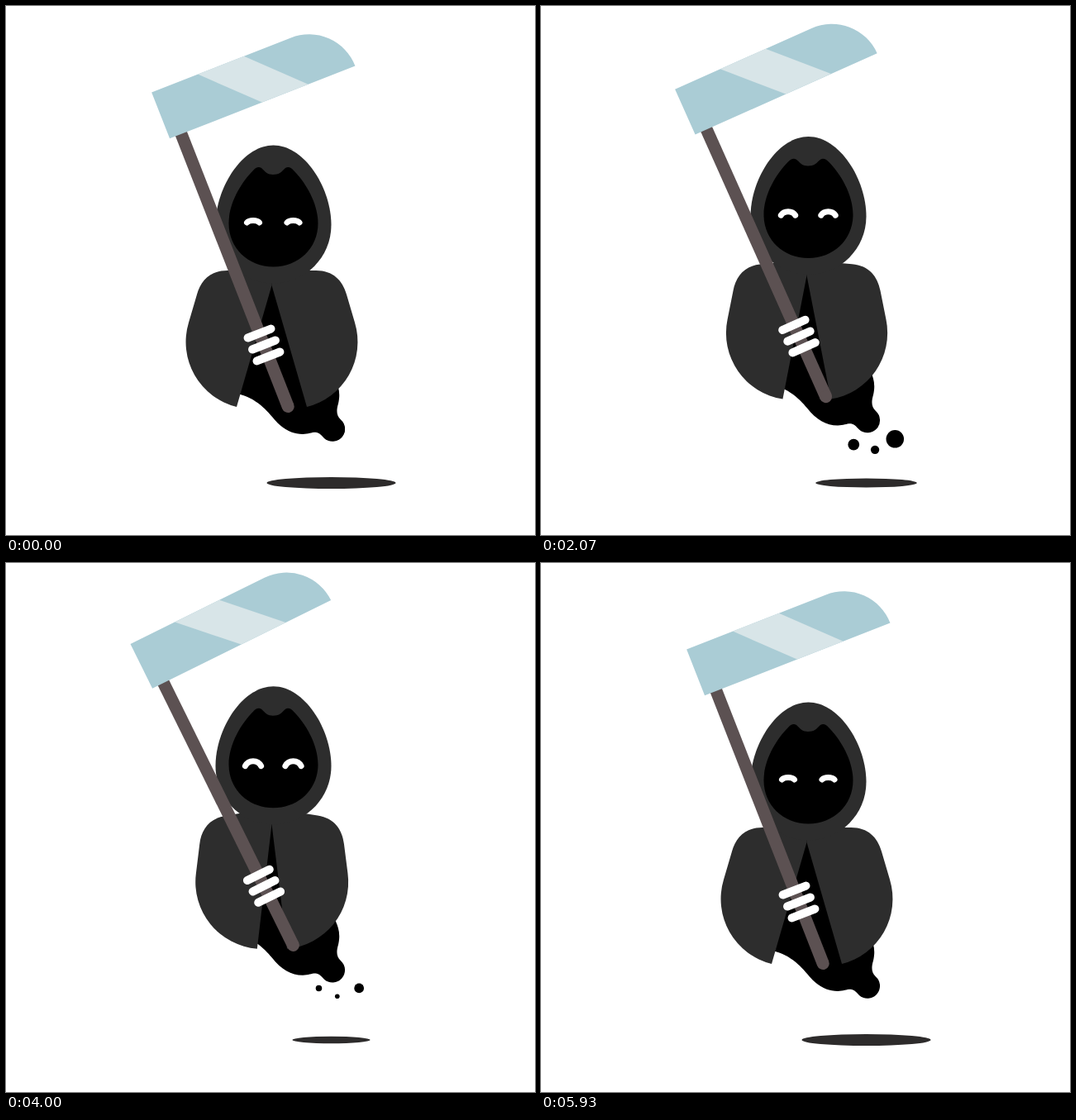
An HTML page for the animation above (6 s loop, 640x640 px).

```html
<!DOCTYPE html>
<html lang="en">
<head>
<meta charset="utf-8">
<title>Floating reaper</title>
<style>
html, body { margin: 0; width: 100%; height: 100%; overflow: hidden; background: #fff; }
svg { display: block; width: 100vw; height: 100vh; }
</style>
</head>
<body>
<svg viewBox="0 0 640 640">
  <defs>
    <path id="cloak" d="M279 485L321.5 338L322 320H268C247 320 236 332 231 349L221 383A81 81 0 0 0 279 485Z"/>
  </defs>
  <ellipse id="shadow" cx="393.5" cy="577" fill="#2d2b2b"/>
  <g id="body">
    <g id="drops"><circle/><circle/><circle/></g>
    <path d="M321 330L270 468C296 469 312 485 322 497C333 511 345 518 359 518C367 518 371 515 376 516C380 517 382 520 385 523
      A14.7 14.7 0 1 0 405 500.5C399 495 400 488 402 481C405 468 402 460 399 453L395 438L330 335Z"/>
    <g fill="#2d2d2d">
      <use id="left" href="#cloak"/>
      <g transform="translate(643 0) scale(-1 1)"><use id="right" href="#cloak"/></g>
      <path d="M323.5 168.5C361 168.5 393.5 220 393.5 265C393.5 304 362 335.5 323.5 335.5C285 335.5 253.5 304 253.5 265C253.5 220 286 168.5 323.5 168.5Z"/>
    </g>
    <path d="M323 204C317 204 314 201 311 198C308 194 303 194 299 199C285 213 269.5 238 269.5 263C269.5 293 293 315.5 323.5 315.5
      C354 315.5 377.5 293 377.5 263C377.5 238 362 213 348 199C344 194 339 194 336 198C333 201 330 204 323 204Z"/>
    <path id="eyes" fill="none" stroke="#fff" stroke-width="7" stroke-linecap="round"/>
    <!-- the scythe is drawn around the hand that holds it -->
    <g id="scythe">
      <path d="M0 -277V80" stroke="#5c5152" stroke-width="15"/>
      <circle cy="80" r="7.5" fill="#5c5152"/>
      <path d="M-15 -334H166A60 60 0 0 1 226 -274H-15Z" fill="#aaccd5"/>
      <path d="M45 -334H105L165 -274H105Z" fill="#d8e5e8"/>
      <path d="M-15 -15H15M-15 0H15M-15 15H15" stroke="#fff" stroke-width="10" stroke-linecap="round"/>
    </g>
  </g>
</svg>
<script>
const LOOP = 6000;
const get = id => document.getElementById(id);
const set = (el, attrs) => { for (const k in attrs) el.setAttribute(k, attrs[k]); };
const mix = (a, b, t) => a + (b - a) * t;

const steep = t => t * t * t * (t * (6 * t - 15) + 10);
const soft = t => (1 - Math.cos(Math.PI * t)) / 2;
const step = (t, from, to, ease) => ease(Math.min(1, Math.max(0, (t - from) / (to - from))));

// Height of the float, 0 (low) to 1 (high): two rises and falls per loop
const lift = (t, ease) =>
  step(t, 0, 1390, ease) - step(t, 1390, 2785, ease) +
  step(t, 2785, 4250, ease) - step(t, 4250, 5900, ease);

// Place at full height, swing away from it while sinking, relative size
const drops = [
  { x: 421.6, y: 533.5, dx: 14, dy: 1.5, scale: 1 },
  { x: 373, y: 533, dx: 11, dy: 17, scale: .64 },
  { x: 395, y: 543, dx: 19, dy: 9, scale: .48 }
];

// The drops leave the tail, swing with the float and shrink away
function moveDrops(t, q) {
  const out = step(t, 0, 1000, soft);
  const second = step(t, 3000, 4000, soft);
  const size = 14 * (1 - step(t, 0, 5900, u => u ** 1.4));
  drops.forEach((d, i) => {
    const x = d.x + 4.5 * second + (1 - q) * (d.dx + 15 * second);
    const y = d.y + (1 - q) * (d.dy + 3 * second);
    set(get("drops").children[i], { cx: mix(396, x, out), cy: mix(512, y, out), r: size * d.scale });
  });
}

function eye(x, q) {
  const w = 7.5 + 2.2 * q, y = 262 + 3 * q, top = 258.7 - 1.8 * q;
  return `M${x - w} ${y}C${x - w * .6} ${top} ${x + w * .6} ${top} ${x + w} ${y}`;
}

function draw(t) {
  const q = lift(t, steep), r = lift(t, soft);
  set(get("shadow"), { rx: 78 - 32 * q, ry: 7 - 2.9 * q });
  set(get("body"), { transform: `translate(0 ${-20 * q})` });
  set(get("left"), { transform: `rotate(${-9.8 * q} 297 335)` });
  set(get("right"), { transform: `rotate(${-9.8 * r} 297 335)` });
  set(get("scythe"), { transform: `translate(312 410) rotate(${-21.4 - 5.1 * q})` });
  set(get("eyes"), { d: eye(299, q) + eye(347.5, q) });
  moveDrops(t, q);
}

function frame() {
  draw(performance.now() % LOOP);
  requestAnimationFrame(frame);
}
frame();
</script>
</body>
</html>
```
